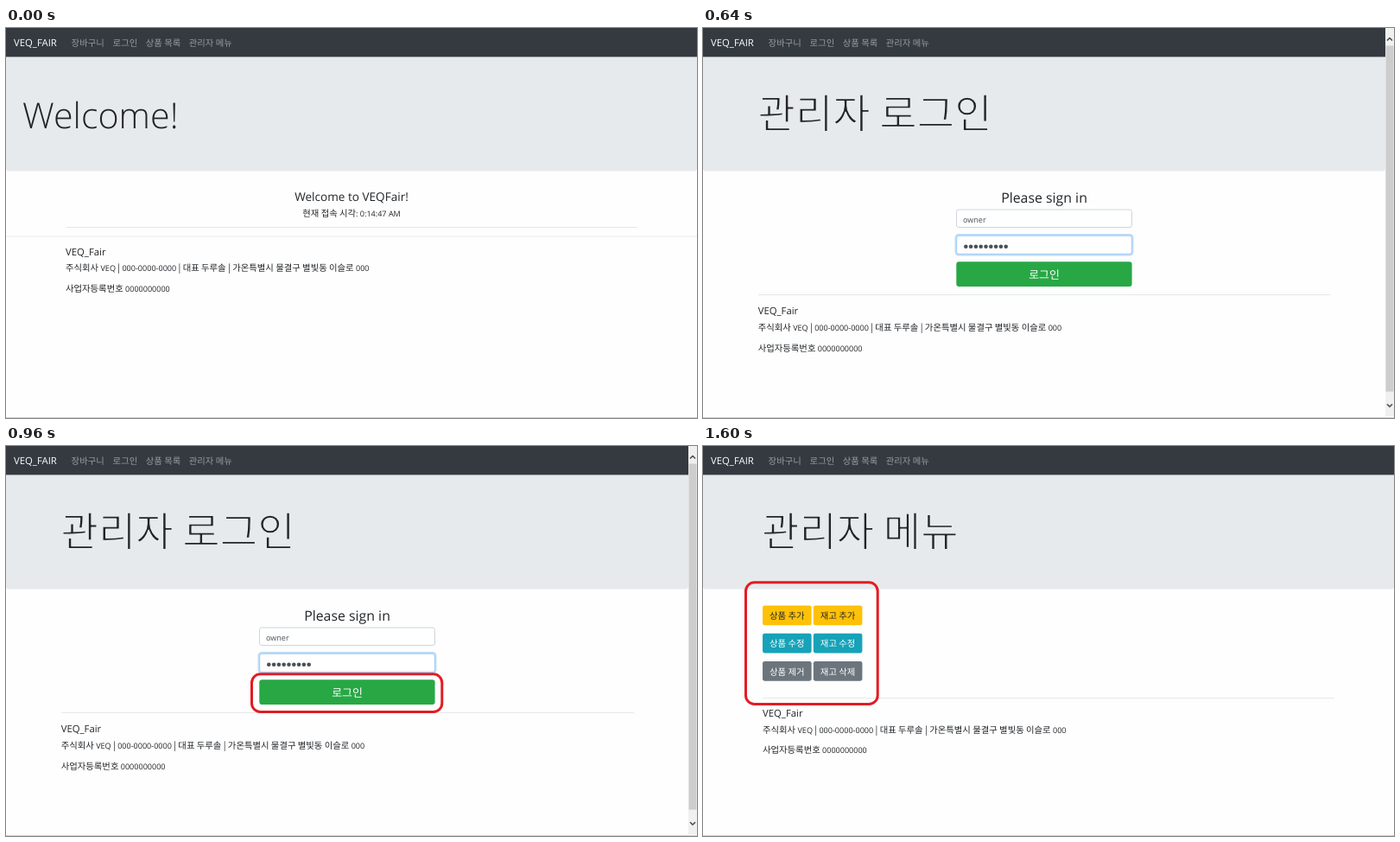
Write an HTML page with a canvas that moves like this. It is 800 px wide and 451 px high and loops after 1920 ms.

```html
<!DOCTYPE html>
<html lang="ko">
<head>
<meta charset="utf-8">
<title>VEQ_FAIR</title>
<style>
html, body { margin: 0; width: 100%; height: 100%; overflow: hidden; background: #fff; }
canvas { display: block; width: 800px; height: 451px; }
</style>
</head>
<body>
<canvas id="stage"></canvas>
<script>
const W = 800, H = 451, STEP = 320;
const INK = '#212529', RED = '#e31c23', FIELD = '#495057', HERO = '#e7eaed';
const BASE = 9.54;
const LATIN = '"Open Sans", "Noto Sans", sans-serif';
const HANGUL = '"Noto Sans CJK KR", "Noto Sans CJK", sans-serif';

const canvas = document.getElementById('stage');
const ctx = canvas.getContext('2d');
const ratio = window.devicePixelRatio || 1;
canvas.width = Math.round(W * ratio);
canvas.height = Math.round(H * ratio);
ctx.scale(ratio, ratio);
ctx.textRendering = 'geometricPrecision';
ctx.lineJoin = 'round';

function rect(x, y, w, h, color) {
  ctx.fillStyle = color;
  ctx.fillRect(x, y, w, h);
}

function box(x1, y1, x2, y2, r, fill, stroke, width = 1) {
  ctx.beginPath();
  ctx.roundRect(x1, y1, x2 - x1, y2 - y1, r);
  if (fill) { ctx.fillStyle = fill; ctx.fill(); }
  if (stroke) { ctx.strokeStyle = stroke; ctx.lineWidth = width; ctx.stroke(); }
}

const isHangul = run => /[가-힣|]/.test(run);

// Latin and Hangul runs use separate fonts with matched optical sizes.
function setFont(run, size, weight) {
  ctx.font = isHangul(run)
    ? `${weight} ${size * 1.087}px ${HANGUL}`
    : `${weight} ${size * 0.95}px ${LATIN}`;
}

function text(str, x, y, { size = BASE, color = INK, weight = 400, center = false, backdrop } = {}) {
  const runs = str.match(/[가-힣|]+|[^가-힣|]+/g);
  const widths = runs.map(run => {
    setFont(run, size, weight);
    return ctx.measureText(run).width;
  });
  if (center) x -= widths.reduce((a, b) => a + b, 0) / 2;
  runs.forEach((run, i) => {
    setFont(run, size, weight);
    ctx.fillStyle = color;
    ctx.fillText(run, x, y);
    // Hangul has no light weight here: trim its edges with the backdrop colour.
    if (backdrop && isHangul(run)) {
      ctx.strokeStyle = backdrop;
      ctx.lineWidth = 1.5;
      ctx.strokeText(run, x, y);
    }
    x += widths[i];
  });
}

function header(title, x, width, size) {
  box(0, 30, width, 165.5, 3, HERO);
  rect(0, 0, width, 33.4, '#343a40');
  text('VEQ_FAIR', 9, 21, { size: 11.92, color: '#fff' });
  [['장바구니', 75.6], ['로그인', 123.6], ['상품 목록', 161.8], ['관리자 메뉴', 211.8]]
    .forEach(([label, left]) => text(label, left, 20.9, { color: '#999c9f' }));
  text(title, x, 116, { size, weight: 300, backdrop: HERO });
}

function footer(x, y) {
  text('VEQ_Fair', x, y, { size: 11.92 });
  text('주식회사 VEQ | 000-0000-0000 | 대표 두루솔 | 가온특별시 물결구 별빛동 이슬로 000', x, y + 18.7);
  text('사업자등록번호 0000000000', x, y + 42.5);
}

function rule(x1, x2, y, color = '#e6e7e8') {
  rect(x1, y, x2 - x1, 1, color);
}

function chevron(y, dir) {
  ctx.beginPath();
  ctx.moveTo(792, y + 1.5 * dir);
  ctx.lineTo(795, y - 1.5 * dir);
  ctx.lineTo(798, y + 1.5 * dir);
  ctx.strokeStyle = '#4c4c4c';
  ctx.lineWidth = 1.6;
  ctx.stroke();
}

function scrollbar() {
  rect(790, 0, 10, 449, '#f0f0f0');
  rect(790.5, 20.5, 9, 400, '#cdcdcd');
  chevron(13, 1);
  chevron(436.5, -1);
}

function home() {
  header('Welcome!', 19, 800, 43.4);
  text('Welcome to VEQFair!', 400, 200, { size: 14.3, center: true });
  text('현재 접속 시각: 0:14:47 AM', 400, 218.2, { center: true });
  rule(69, 731, 230);
  rule(0, 800, 240.5, '#ececec');
  footer(69, 262.7);
}

function login() {
  header('관리자 로그인', 63.5, 790, 43.4);
  scrollbar();
  text('Please sign in', 395, 202, { size: 16.7, center: true });
  box(293.5, 210, 496.5, 230.5, 2.5, '#fff', '#ced4da');
  text('owner', 301, 225, { color: FIELD });
  box(293, 239.5, 497, 262, 3, '#fff', '#bfdcf8', 3);
  box(293.7, 240.2, 496.3, 261.3, 2.5, '#fff', '#94c5f5', 0.8);
  ctx.fillStyle = FIELD;
  for (let i = 0; i < 9; i++) {
    ctx.beginPath();
    ctx.arc(304.3 + i * 5.8, 252.7, 2.3, 0, Math.PI * 2);
    ctx.fill();
  }
  box(293.3, 270.3, 496.6, 299, 3, '#28a745');
  text('로그인', 395, 289.5, { size: 11.92, color: '#fff', center: true });
  rule(64, 727, 308);
  footer(63.7, 331.2);
}

function button(label, x, y, fill, color) {
  box(x, y, x + 56.6, y + 22.8, 2.4, fill);
  text(label, x + 28.3, y + 15.6, { color, center: true });
}

function menu() {
  header('관리자 메뉴', 68, 800, 43.4);
  [['추가', '추가', '#ffc107', INK],
   ['수정', '수정', '#17a2b8', '#fff'],
   ['제거', '삭제', '#6c757d', '#fff']].forEach(([item, stock, fill, color], i) => {
    const y = 184.5 + i * 32.2;
    button('상품 ' + item, 69, y, fill, color);
    button('재고 ' + stock, 127.8, y, fill, color);
  });
  rule(69, 731, 291);
  footer(69, 312.9);
}

const scenes = [
  { page: home, edge: true },
  { page: home, edge: true, mark: [209.7, 4, 265.8, 31, 7] },
  { page: login, edge: true },
  { page: login, edge: true, mark: [284.5, 263.8, 504.8, 307.4, 10] },
  { page: menu },
  { page: menu, edge: true, mark: [49.5, 157.8, 202.2, 298.4, 10] }
];

let shown = -1;

function draw(now) {
  const index = Math.floor(now / STEP) % scenes.length;
  if (index !== shown) {
    shown = index;
    const { page, mark, edge } = scenes[index];
    rect(0, 0, W, H, '#fefefe');
    page();
    if (edge) rect(0, 450, W, 1, '#cfcfcf');
    if (mark) box(...mark, null, RED, 3);
  }
  requestAnimationFrame(() => draw(performance.now() - start));
}

const start = performance.now();
draw(0);
</script>
</body>
</html>
```
